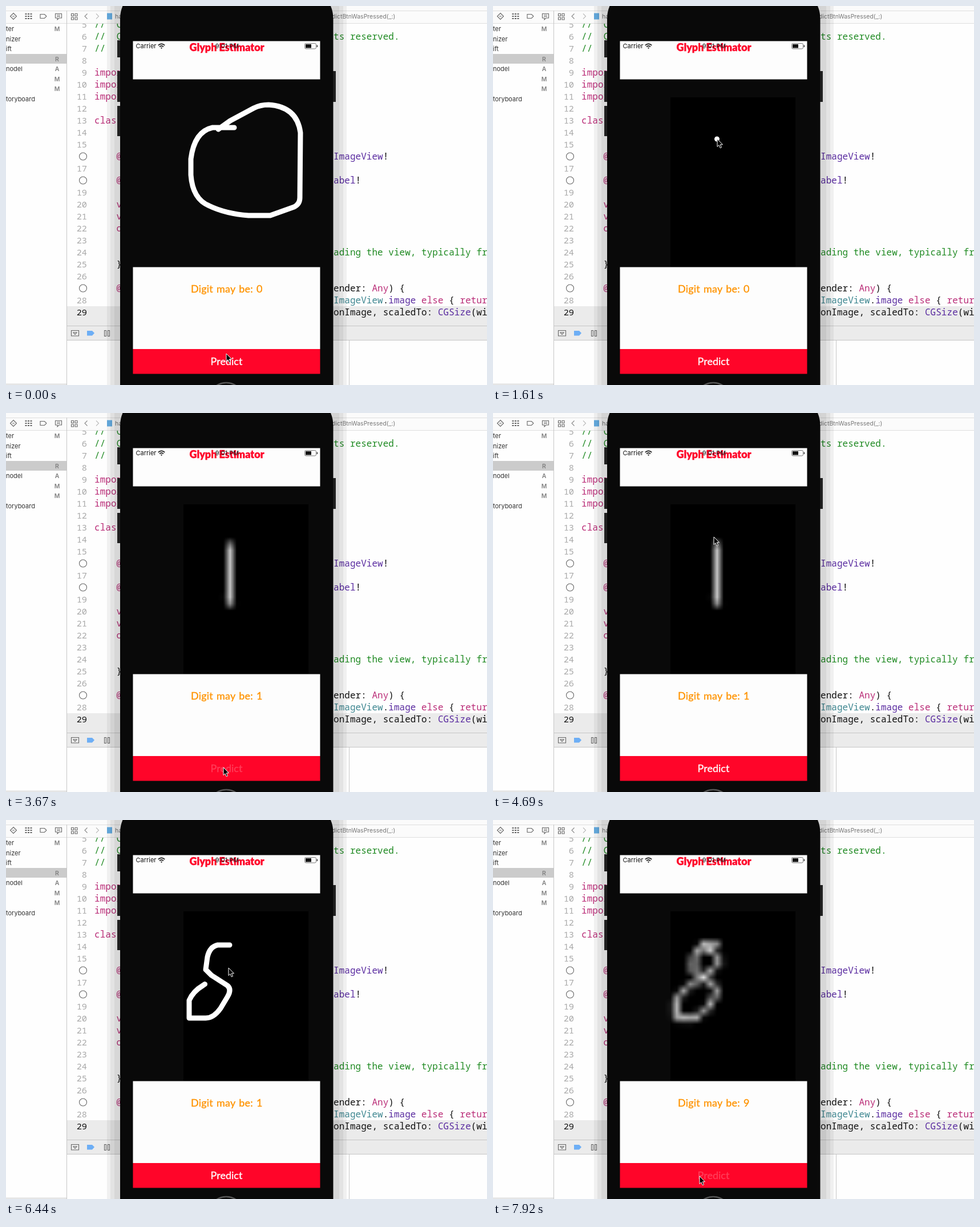
An HTML page with a canvas for the animation above (8 s loop, 843x664 px).

```html
<!DOCTYPE html>
<html lang="en">
<head>
<meta charset="utf-8">
<title>Digit drawing demo</title>
<style>
html, body { margin: 0; width: 100%; height: 100%; overflow: hidden; background: #fff; }
#stage { position: relative; width: 843px; height: 664px; overflow: hidden; }
#stage > * { position: absolute; left: 0; top: 0; }
#stage > #ink { left: 222px; top: 129px; }
text { white-space: pre; }
.code { font: 16px "Noto Sans Mono", "DejaVu Sans Mono", monospace; letter-spacing: .03px; }
.num { font: 15.3px "Noto Sans Mono", "DejaVu Sans Mono", monospace; fill: #a9a9a9; text-anchor: end; }
.num.current { fill: #111; font-weight: 500; }
.ui { font: 11px Inter, "Liberation Sans", sans-serif; fill: #333; }
.mark { font-weight: 600; font-size: 10.5px; fill: #808080; text-anchor: middle; }
.path { font-size: 10.5px; fill: #777; }
.status { font: 11px Inter, "Liberation Sans", sans-serif; fill: #111; }
.app { font: 18px Lato, "Open Sans", sans-serif; stroke-width: .35px; }
.icon { fill: none; stroke: #666; stroke-width: 1.1; }
.key { fill: #ba2d78; } .note { fill: #1f8a22; } .type { fill: #5a2ca0; }
.own { fill: #3f8791; } .plain { fill: #111; }
</style>
</head>
<body>
<div id="stage">
<svg width="843" height="664">
  <rect width="843" height="664" fill="#fefefe"/>
  <rect width="843" height="30" fill="#fbfbfb"/>
  <path d="M0 8.5H843M0 30.5H843" stroke="#dedede"/>
  <rect y="84" width="106" height="17" fill="#cbcbcb"/>
  <g id="files"></g>
  <rect x="107" y="526" width="736" height="60" fill="#ebebeb"/>
  <path d="M107 560.5H843M107 585.5H843M601.5 586V664M106.5 8V664M0 662.5H106" stroke="#c6c6c6"/>
  <g class="icon">
    <path d="M13 12.5L18.5 18L13 23.5L7.5 18ZM11 18H15"/>
    <path d="M33.5 14H45.5M33.5 18H45.5M33.5 22H45.5" stroke-width="2.2" stroke-dasharray="3 1.5"/>
    <path d="M60 14.5H67.5L71 18L67.5 21.5H60Z"/>
    <path d="M86.5 13.5H97.5V21H93L90 24V21H86.5ZM89 16H95M89 18.5H95"/>
    <path d="M114.5 13.5h4v4h-4zm6.500 0h4v4h-4zm-6.500 6.500h4v4h-4zm6.500 0h4v4h-4z"/>
    <path d="M142.5 13.5L138 18L142.5 22.5" stroke="#888"/>
    <path d="M158 13.5L162.5 18L158 22.5" stroke="#bbb"/>
    <path d="M114.5 568.5h13v9.500h-13zM118 572h6l-3 3.500z"/>
    <path d="M172.5 568.5h3v10h-3zm6 0h3v10h-3z"/>
  </g>
  <rect x="177" y="12.5" width="9" height="11" fill="#66aee3"/>
  <path d="M142 569H151L155 573L151 577.5H142Z" fill="#6daef5"/>
  <text class="ui path" x="191" y="22">ha</text>
  <text class="ui path" x="571" y="22">dictBtnWasPressed(_:)</text>
  <clipPath id="page"><rect x="107" y="31" width="736" height="530"/></clipPath>
  <g id="editor" clip-path="url(#page)"></g>

  <g fill="#000" fill-opacity=".055">
    <rect x="177" y="-80" width="420" height="900" rx="75"/>
    <rect x="183" y="-70" width="408" height="900" rx="70"/>
    <rect x="190" y="-60" width="394" height="900" rx="64"/>
  </g>
  <path d="M195 60H202V90H195ZM195 114H202V168H195ZM195 175H202V228H195ZM570 114H578V168H570Z" fill="#202020"/>
  <rect x="200" y="-34" width="373.5" height="800" rx="56" fill="#090909"/>
  <path d="M222.5 61.5h328v67h-328zM222.5 457.5h328V601h-328z" fill="#fdfdfd"/>
  <path d="M222.5 601h328v43.500h-328z" fill="#ff0529"/>
  <circle cx="386" cy="691" r="31" fill="none" stroke="#555" stroke-width="2.5"/>
  <text class="app" x="387" y="79" text-anchor="middle" style="font-weight:900" fill="#ff0529" stroke="#ff0529">Glyph Estimator</text>
  <text class="status" x="227.5" y="74">Carrier</text>
  <text class="status" x="387.5" y="74" text-anchor="middle">9:01 PM</text>
  <g fill="none" stroke="#111" stroke-width="1.7">
    <path d="M266.8 68.8Q272.5 63.8 278.2 68.8M269 71.3Q272.5 68.3 276 71.3"/>
    <path d="M270.7 72.7H274.3L272.5 75Z" fill="#111" stroke="none"/>
    <rect x="523.5" y="65.5" width="20" height="9.5" rx="2.2" stroke="#777" stroke-width="1"/>
    <path d="M525 67H535V73.5H525ZM544.8 68.5H546V72H544.8Z" fill="#111" stroke="none"/>
  </g>
  <text id="guess" class="app" x="324" y="502" fill="#ff9300" stroke="#ff9300" letter-spacing=".2" word-spacing="1.3"></text>
  <text id="button" class="app" x="386.5" y="629" text-anchor="middle" fill="#fff" stroke="#fff">Predict</text>
</svg>
<canvas id="ink" width="329" height="328"></canvas>
<svg width="843" height="664">
  <path id="cursor" d="M0 0V13.5L3 10.7L5.2 15.8L7.5 14.8L5.3 9.8H9.5Z" stroke="#fff"/>
</svg>
</div>
<script>
const $ = id => document.getElementById(id);

function add(parent, tag, attrs, text = "") {
  const el = document.createElementNS("http://www.w3.org/2000/svg", tag);
  for (const name in attrs) el.setAttribute(name, attrs[name]);
  el.textContent = text;
  parent.appendChild(el);
  return el;
}

// Project navigator
["ter M", "nizer ", "ift ", " R", "nodel A", " M", " M", "toryboard "].forEach((row, i) => {
  const [name, mark] = row.split(" ");
  const y = 44 + i * 17.5;
  add($("files"), "text", { x: 0, y, class: "ui" }, name);
  add($("files"), "text", { x: 89.5, y, class: "ui mark" }, mark);
});

// Source editor
const baseline = n => 59 + (n - 6) * 21;
const outlets = [16, 18, 27];
for (let n = 5; n <= 29; n++) {
  const y = baseline(n);
  if (outlets.includes(n)) add($("editor"), "circle", { cx: 135, cy: y - 5.5, r: 6.5, class: "icon" });
  else add($("editor"), "text", { x: 142, y, class: n === 29 ? "num current" : "num" }, n);
}

// Each run is "class:text"
function codeLine(n, x, ...runs) {
  const line = add($("editor"), "text", { x, y: baseline(n), class: "code" });
  for (const run of runs) {
    const at = run.indexOf(":");
    add(line, "tspan", { class: run.slice(0, at) }, run.slice(at + 1));
  }
}
const LEFT = 155, INDENT = 193.5, RIGHT = 574;
for (const n of [5, 6]) codeLine(n, LEFT, "note://  C");
codeLine(7, LEFT, "note://");
for (const n of [9, 10, 11]) codeLine(n, LEFT, "key:import");
codeLine(13, LEFT, "key:class");
for (const n of outlets) codeLine(n, INDENT, "key:@");
for (const n of [20, 21]) codeLine(n, INDENT, "key:var");
codeLine(22, INDENT, "key:override");
codeLine(25, INDENT, "plain:}");
codeLine(6, RIGHT, "note:ts reserved.");
codeLine(16, RIGHT, "type:ImageView", "plain:!");
codeLine(18, RIGHT, "type:abel", "plain:!");
codeLine(24, RIGHT, "note:ading the view, typically from");
codeLine(27, RIGHT, "plain:ender: ", "key:Any", "plain:) {");
codeLine(28, RIGHT, "own:ImageView", "plain:.", "type:image", "key: else", "plain: { ", "key:return");
codeLine(29, RIGHT, "plain:onImage, scaledTo: ", "type:CGSize", "plain:(width");

// lead: how far the pointer runs ahead of the ink, power: how the pen speeds up
const digits = [
  { begin: -1, end: 0, press: 1, release: 3, guess: 0, lead: 0, power: 1,
    d: "M400 213H362Q330 220 324 268V296Q327 338 356 350Q385 364 425 367H463L505 352Q515 347 515 336L516 222Q510 176 460 173Q446 173 434 179L393 201L372 216" },
  { begin: 11, end: 16, press: 23, release: 26, guess: 1, lead: 0, power: 1,
    d: "M392.5 233V334L391.5 332" },
  { begin: 33, end: 47, press: 54, release: 55, guess: 9, lead: 1.5, power: 1.24,
    d: "M392 219H371Q357 222 353 240L350 262L360 272L388 290Q396 297 388 310L376 330Q364 347 350 347H321V316Q328 300 345 290L385 263Q397 256 394 242L386 232L367 221" },
];
for (const digit of digits) {
  digit.shape = new Path2D(digit.d);
  digit.curve = document.createElementNS("http://www.w3.org/2000/svg", "path");
  digit.curve.setAttribute("d", digit.d);
  digit.total = digit.curve.getTotalLength();
}

const clamp = u => Math.min(1, Math.max(0, u));
const ease = u => u * u * (3 - 2 * u);
const drawn = (digit, k) =>
  digit.total * clamp((k - digit.begin) / (digit.end - digit.begin)) ** digit.power;

// Pointer travel between strokes
const moves = [
  { from: 3, to: 10, x: 391, y: 231 },
  { from: 17, to: 21, x: 381, y: 621 },
  { from: 25, to: 29, x: 387, y: 217 },
  { from: 48, to: 51, x: 355, y: 642 },
  { from: 51, to: 54, x: 362, y: 624 },
];

function pointerAt(k) {
  let x = 386, y = 609;
  for (const move of moves) {
    const pen = digits.find(g => g.end < move.from && g.end > move.from - 4 && g.begin > 0);
    if (pen && k >= pen.begin) ({ x, y } = pen.curve.getPointAtLength(drawn(pen, k + pen.lead)));
    const u = ease(clamp((k - move.from) / (move.to - move.from)));
    x += (move.x - x) * u;
    y += (move.y - y) * u;
  }
  return [Math.round(x), Math.round(y)];
}

const ink = $("ink").getContext("2d");
const tiny = document.createElement("canvas");
tiny.width = tiny.height = 28;
const small = tiny.getContext("2d");

function trace(ctx, digit, length, scale) {
  ctx.save();
  ctx.scale(scale, scale);
  ctx.translate(-222, -129);
  ctx.lineWidth = 9;
  ctx.lineCap = ctx.lineJoin = "round";
  ctx.strokeStyle = "#fff";
  ctx.setLineDash([Math.max(length, .1), 9999]);
  ctx.stroke(digit.shape);
  ctx.restore();
}

// Shrinks the drawing to 28 by 28 cells and stretches it back
function traceSoft(digit) {
  small.clearRect(0, 0, 28, 28);
  trace(small, digit, digit.total, 28 / 329);
  ink.drawImage(tiny, 0, 0, 329, 328);
}

const LOOP = 8000, STEPS = 54, STEP = 7920 / STEPS;

function draw(time) {
  const k = Math.min(STEPS, Math.floor((time % LOOP + 14) / STEP));
  const digit = digits.filter(g => k >= g.begin).pop();
  const judged = digits.filter(g => k >= g.press).pop() || digits[0];

  ink.clearRect(0, 0, 329, 328);
  if (k > 0) {
    ink.fillStyle = "#000";
    ink.fillRect(89, 31, 219, 297);
  }
  if (k >= digit.press) traceSoft(digit);
  else trace(ink, digit, drawn(digit, k), 1);

  $("cursor").setAttribute("transform", `translate(${pointerAt(k)})`);
  $("guess").textContent = "Digit may be: " + judged.guess;
  $("button").setAttribute("opacity", k >= digit.press && k < digit.release ? .22 : 1);
}

const start = performance.now();
function tick() {
  draw(performance.now() - start);
  requestAnimationFrame(tick);
}
tick();
</script>
</body>
</html>
```
